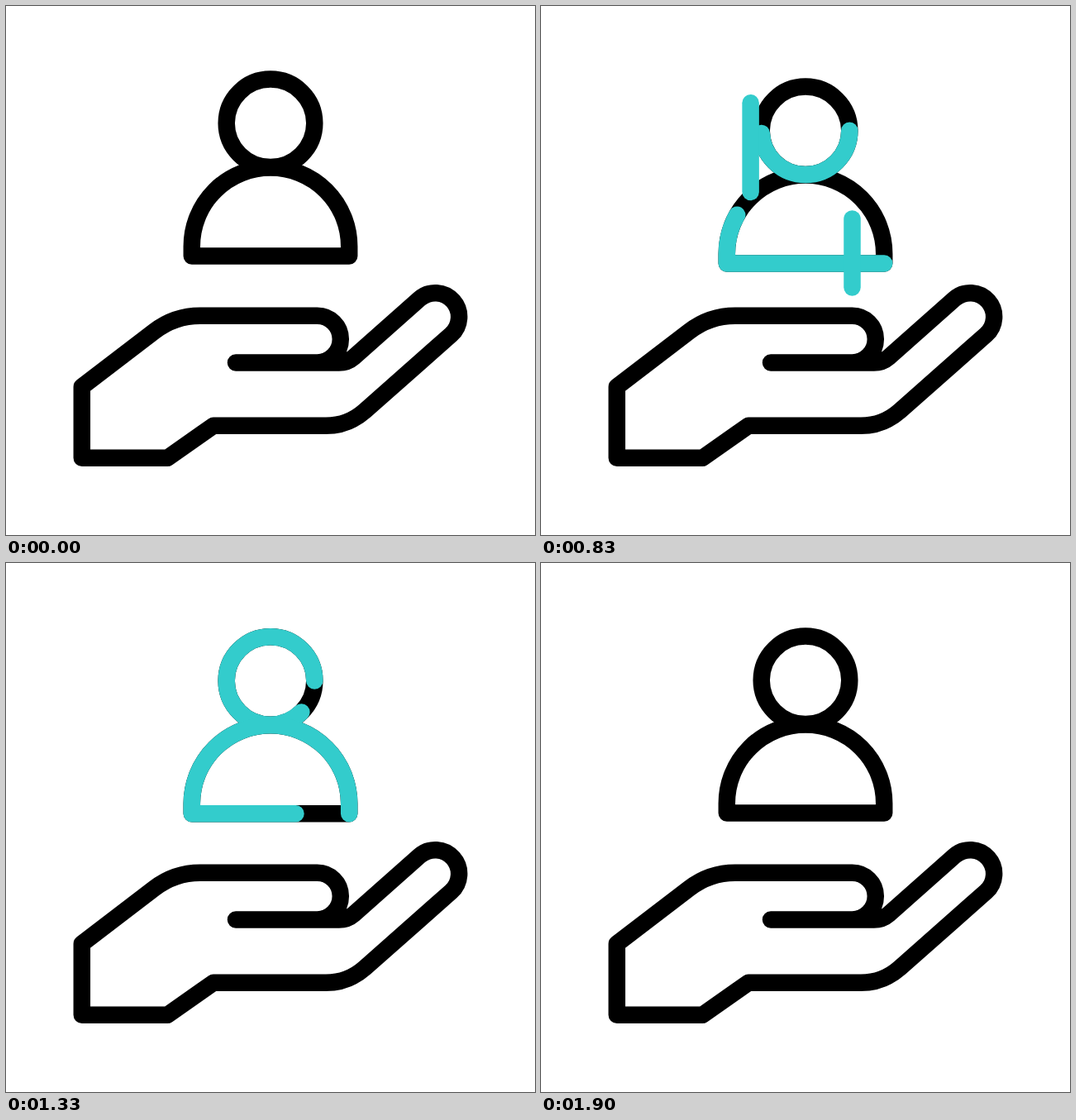
An HTML page for the animation above (2500 ms loop, 640 px wide and 640 px high).

```html
<!DOCTYPE html>
<html lang="en">
<head>
<meta charset="utf-8">
<title>Person held above a hand</title>
<style>
  html, body { margin: 0; height: 100%; overflow: hidden; background: #fff; }
  svg { display: block; width: 100vw; height: 100vh; }
  path { fill: none; stroke: #000; stroke-width: 20.5; stroke-linecap: round; stroke-linejoin: round; }
  .accent { stroke: #33cccc; display: none; }
</style>
</head>
<body>
<svg viewBox="0 0 640 640">
  <path d="M278 431.5H403A27 27 0 0 0 420.6 424.9L500.2 354.4A28.8 28.8 0 0 1 538.4 397.6L434.1 489.9
    A71 71 0 0 1 387 507.8H250.8L195.3 546.8H91.8V460.7L179.4 393.7A91 91 0 0 1 235 374.8H376.5
    A28.3 28.3 0 0 1 376.5 431.4"/>
  <g id="person">
    <path d="M373.3 141.8A53.3 53.3 0 0 1 266.7 141.8A53.3 53.3 0 0 1 373.3 141.8Z"/>
    <path d="M415.2 302.5H224.8V290.7A95.2 95.2 0 0 1 415.2 290.7Z"/>
    <path id="head" class="accent" pathLength="1" d="M373.3 141.8A53.3 53.3 0 0 1 266.7 141.8A53.3 53.3 0 0 1 373.3 141.8"/>
    <path id="body" class="accent" pathLength="1" d="M415.2 302.5H224.8V290.7A95.2 95.2 0 0 1 415.2 290.7V302.5"/>
  </g>
  <path id="left" class="accent" pathLength="1" d="M253.6 332.8V117.3"/>
  <path id="right" class="accent" pathLength="1" d="M376.5 340.5V222"/>
</svg>
<script>
  const LOOP = 2500, STEP = 1000 / 30, DROP = 28.5;
  const get = id => document.getElementById(id);
  const [person, head, body, left, right] = ['person', 'head', 'body', 'left', 'right'].map(get);

  // Eased progress from 0 to 1 between two ticks
  function ease(tick, from, to) {
    const x = Math.min(1, Math.max(0, (tick - from) / (to - from)));
    return x * x * (3 - 2 * x);
  }

  // Show only the part of a path between two fractions of its length
  function trim(path, start, end) {
    const size = end - start;
    path.style.display = size > 0.0005 ? 'inline' : 'none';
    path.style.strokeDasharray = `${size} 2`;
    path.style.strokeDashoffset = -start;
  }

  function streak(path, tick, delay) {
    trim(path, ease(tick, 20 + delay, 30 + delay), ease(tick, 13 + delay, 24 + delay));
  }

  function draw(ms) {
    const tick = Math.floor((ms % LOOP + 3.5) / STEP) % 75;
    const bob = ease(tick, 22, 30) - ease(tick, 30, 41) + ease(tick, 41, 49) - ease(tick, 49, 57);
    person.setAttribute('transform', `translate(0 ${bob * DROP})`);

    const start = ease(tick, 36.4, 52.6), end = ease(tick, 19.3, 30.85);
    trim(head, start, end);
    trim(body, start, end);
    streak(left, tick, 0);
    streak(right, tick, 5);
  }

  let origin;
  function loop(now) {
    origin ??= now;
    draw(now - origin);
    requestAnimationFrame(loop);
  }
  draw(0);
  requestAnimationFrame(loop);
</script>
</body>
</html>
```
